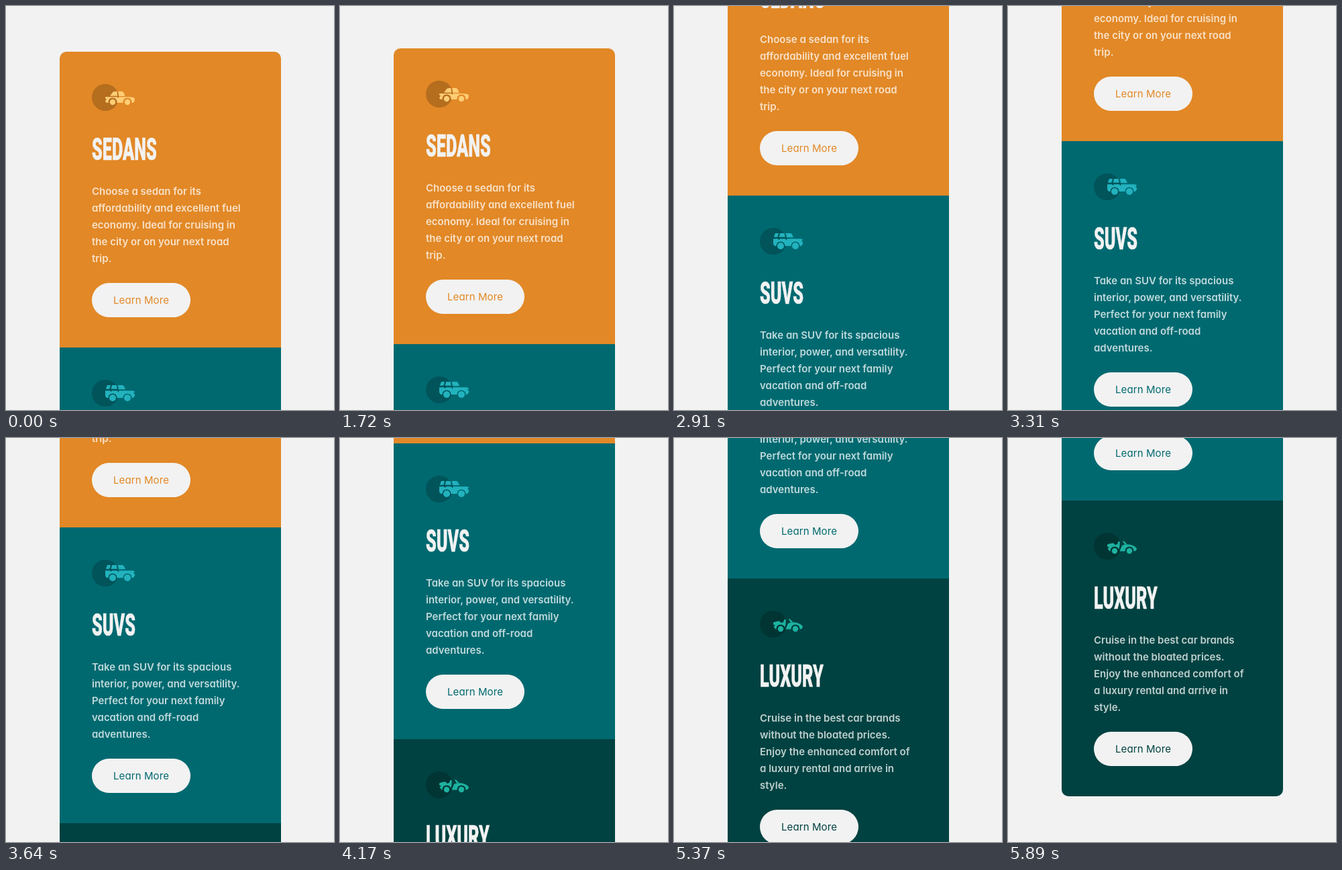
Recreate the animation shown at these times as an HTML page. Size 489 by 601 pixels, loop 7680 ms.

```html
<!DOCTYPE html>
<html lang="en">
<head>
<meta charset="utf-8">
<title>Car cards</title>
<style>
  html, body {
    margin: 0;
    width: 100%;
    height: 100%;
    overflow: hidden;
    background: #f2f2f2;
  }
  body { position: relative; }

  .page {
    position: absolute;
    left: 80px;
    top: 68px;
    width: 330px;
    border-radius: 10px;
    overflow: hidden;
    animation: scroll 7680ms infinite;
  }

  /* The page scrolls at about 15 steps per second. */
  @keyframes scroll {
    0%     { top: 68px;   animation-timing-function: step-end; }
    22.39% { top: 63px;   animation-timing-function: steps(18); }
    37.88% { top: -158px; animation-timing-function: steps(11); }
    47.39% { top: -307px; animation-timing-function: steps(8); }
    54.29% { top: -432px; animation-timing-function: steps(11); }
    63.8%  { top: -569px; animation-timing-function: steps(15); }
    76.69%, 100% { top: -787px; }
  }

  .card {
    position: relative;
    height: 440px;
    background: var(--back);
    font: 600 15px/25px Inter, "Open Sans", sans-serif;
    font-feature-settings: "cv11";
    white-space: nowrap;
  }
  .sedan  { --back: #e28826; --car: #ffcd74; }
  .suv    { --back: #006970; --car: #22b2be; }
  .luxury { --back: #004241; --car: #1eb2a0; }

  .card > * { position: absolute; left: 48px; margin: 0; }

  .icon { top: 48px; width: 64px; height: 40px; fill: var(--car); }
  .icon .disc { fill: #000; opacity: .2; }

  h2 {
    top: 121px;
    font: 900 45.5px/50px Roboto, "Liberation Sans", sans-serif;
    color: #f2f2f2;
    -webkit-text-stroke: .6px #f2f2f2;
    transform: scaleX(.555);
    transform-origin: 0 0;
  }
  p { top: 195px; color: rgba(255, 255, 255, .75); }

  .button {
    top: 344px;
    width: 147px;
    height: 51px;
    border-radius: 25.5px;
    background: #f2f2f2;
    color: var(--back);
    font-weight: 400;
    letter-spacing: .1px;
    line-height: 51px;
    text-align: center;
  }
  .defs { position: absolute; width: 0; height: 0; }
</style>
</head>
<body>
<svg class="defs">
  <defs>
    <mask id="arches" maskUnits="userSpaceOnUse" x="0" y="0" width="64" height="40">
      <rect width="64" height="40" fill="#fff"/>
      <circle cx="31" cy="27" r="6.6"/>
      <circle cx="53" cy="27" r="6.6"/>
    </mask>
    <g id="wheels">
      <circle cx="31" cy="27" r="4.2"/>
      <circle cx="53" cy="27" r="4.2"/>
    </g>
  </defs>
</svg>

<main class="page">
  <section class="card sedan">
    <svg class="icon" viewBox="0 0 64 40">
      <circle class="disc" cx="20" cy="20" r="20"/>
      <g mask="url(#arches)">
        <path d="M27 17.8L31 12.5Q32.2 11 34.5 11H37.3L38.3 17.8Z"/>
        <path d="M39.3 11H44Q46.5 11 47.6 13L49.5 18H40.3Z"/>
        <path d="M20 19.2H38L39 21 40.5 19.2H54Q62 19.2 64 21.5L63.5 25Q63 28 60.5 28H23Q21 28 20 25.5L22 22.5 20 21.5Z"/>
      </g>
      <use href="#wheels"/>
    </svg>
    <h2>SEDANS</h2>
    <p>Choose a sedan for its<br>affordability and excellent fuel<br>economy. Ideal for cruising in<br>the city or on your next road<br>trip.</p>
    <div class="button">Learn More</div>
  </section>

  <section class="card suv">
    <svg class="icon" viewBox="0 0 64 40">
      <circle class="disc" cx="20" cy="20" r="20"/>
      <g mask="url(#arches)">
        <path d="M23 8H28L26.3 13.8H20.8Z"/>
        <path d="M30.2 8H36.5L37.8 13.8H28.6Z"/>
        <path d="M38.8 8H45.5Q47 8 47.8 9.5L50 14.2H40.2Z"/>
        <path d="M20 16.2H27L28.5 18 30 16.2H38L39.5 18.5 41 16.2H60Q63.5 16.2 64 18L62 19.8 64 21.5V24L61.5 27H23Q20 26 20 23Z"/>
      </g>
      <circle cx="31" cy="27" r="5"/>
      <circle cx="53" cy="27" r="5"/>
    </svg>
    <h2>SUVS</h2>
    <p>Take an SUV for its spacious<br>interior, power, and versatility.<br>Perfect for your next family<br>vacation and off-road<br>adventures.</p>
    <div class="button">Learn More</div>
  </section>

  <section class="card luxury">
    <svg class="icon" viewBox="0 0 64 40">
      <circle class="disc" cx="20" cy="20" r="20"/>
      <g mask="url(#arches)">
        <path d="M20 17.5Q25 15 29.5 15.5L31.5 18 35 17 36.5 12.5 38.8 13.5 38.5 20 36.5 27.5H23.5L20.5 23.5 23 21.5 20 20.5Z"/>
        <path d="M38.5 27.5L41.5 20Q43.5 17.3 48 17.3 59 17 64 23L63 26.5 60 27.5Z"/>
        <path d="M43 12.8L44.6 12 49.5 17 46 17.2Z"/>
      </g>
      <use href="#wheels"/>
    </svg>
    <h2>LUXURY</h2>
    <p>Cruise in the best car brands<br>without the bloated prices.<br>Enjoy the enhanced comfort of<br>a luxury rental and arrive in<br>style.</p>
    <div class="button">Learn More</div>
  </section>
</main>
</body>
</html>
```
